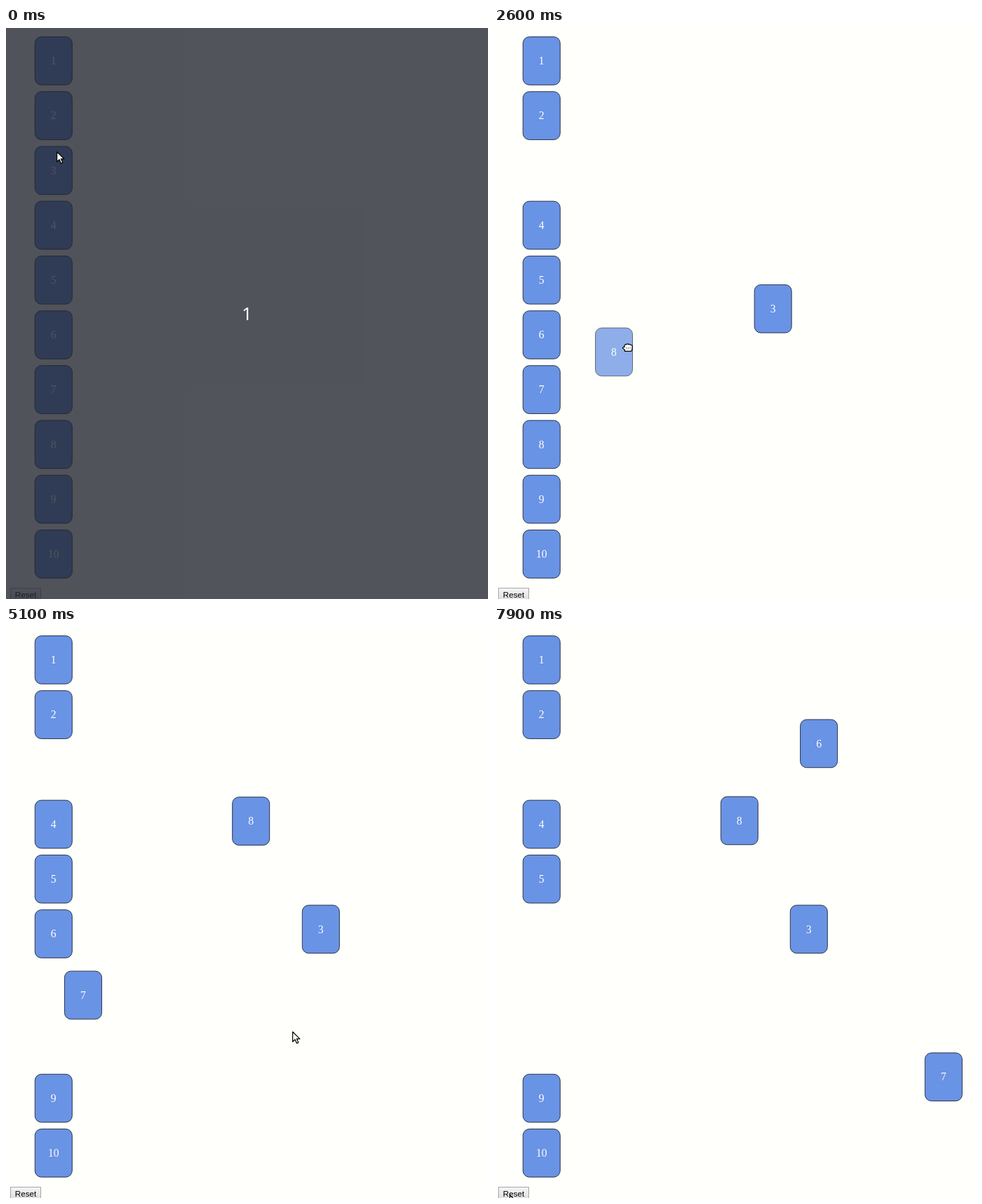
These frames come from a looping animation (687 by 815 pixels, 8 s). An HTML page:

```html
<!DOCTYPE html>
<html lang="en">
<head>
<meta charset="utf-8">
<title>Draggable cards</title>
<style>
  html, body { margin: 0; width: 100%; height: 100%; overflow: hidden; background: #fffffc; }
  #stage { position: relative; width: 687px; height: 815px; overflow: hidden; background: #fffffc; }
  #stage > * { position: absolute; left: 0; top: 0; }
  .card {
    box-sizing: border-box; width: 62px; height: 80px; transform-origin: 0 0;
    border: 1px solid #1c212c; border-radius: 11px; background: #6993e4;
    color: #fff; font: 18px/78px "Liberation Serif", serif; text-align: center;
  }
  #ghost { opacity: .75; }
  #stage > #reset {
    left: 6px; top: 799px; box-sizing: border-box; width: 44px; height: 20px;
    border: 1px solid #a6a6a6; background: linear-gradient(#f5f5f5, #dcdcdc);
    color: #000; font: 11.6px/18px "Liberation Sans", sans-serif; text-align: center;
  }
  #reset.hover { border-color: #777; }
  #shade { width: 687px; height: 815px; background: rgba(34, 38, 47, .787); }
  #count {
    position: absolute; left: 0; right: 0; top: 387px; text-align: center;
    color: #fff; font: 26px/40px "Noto Sans", sans-serif;
  }
  #pointer { overflow: visible; }
  #pointer path { fill: #fff; stroke: #000; stroke-width: 1.2; stroke-linejoin: round; }
  #pointer .knuckles { stroke-dasharray: 1 2; }
</style>
</head>
<body>
<div id="stage">
  <div id="reset">Reset</div>
  <div id="ghost" class="card"></div>
  <div id="shade"><div id="count">1</div></div>
  <svg id="pointer" width="20" height="20">
    <path id="arrow" d="M.6 .8V15L4 11.8 6.4 17.2 8.8 16.1 6.4 10.9H10.8Z"/>
    <g id="hand">
      <path d="M-3.6 5.4V3.4L-6.4 1Q-6.8-.9-4.6-1L-4-.4V-3Q-3.2-4.8-1.4-4.2 .1-5.8 1.6-4.4 3.4-5.3 4.4-3.7 6.8-4 7.1-1.8V1.6L5.8 5.4Z"/>
      <path class="knuckles" d="M-1.5 .9H5"/>
    </g>
  </svg>
</div>
<script>
const LOOP = 8000, STEP = 100;
const SCALE = .869, HOME_X = 47 * SCALE;
const GLIDE = 1920, GLIDE_DELAY = 100;
const DROP_SHIFT = { x: 24, y: 12 };
const homeY = n => (14 + 90 * (n - 1)) * SCALE;

// Turning points of the pointer: time, x, y
const path = [
  [0, 72, 176], [400, 72, 176], [600, 68, 202], [900, 495, 416], [1400, 425, 418],
  [1900, 235, 541], [2200, 87, 588], [3200, 345, 258], [3300, 329, 255],
  [3900, 47, 519], [4400, 284, 531], [4500, 284, 531], [4836, 596, 633],
  [5700, -20, 450], [5800, -20, 445], [6000, 60, 430], [6500, 461, 126],
  [7600, 22, 810], [LOOP, 22, 810]
];

const $ = id => document.getElementById(id);
const mix = (a, b, p) => a + (b - a) * p;
const show = (el, on) => { el.style.display = on ? "" : "none"; };
const place = (el, { x, y }, scale = 1) => {
  el.style.transform = `translate(${x}px,${y}px) scale(${scale})`;
};
const bezier = (a, b, u) => 3 * a * u * (1 - u) ** 2 + 3 * b * u * u * (1 - u) + u ** 3;

// The standard CSS "ease" curve
function ease(p) {
  if (p <= 0) return 0;
  if (p >= 1) return 1;
  let lo = 0, hi = 1;
  for (let i = 0; i < 24; i++) {
    const mid = (lo + hi) / 2;
    if (bezier(.25, .25, mid) < p) lo = mid; else hi = mid;
  }
  return bezier(.1, 1, lo);
}

function pointerAt(t) {
  const i = path.findIndex(k => k[0] > t);
  const [t0, x0, y0] = path[i - 1], [t1, x1, y1] = path[i];
  const p = (t - t0) / (t1 - t0);
  return { x: mix(x0, x1, p), y: mix(y0, y1, p) };
}

// The ghost keeps the pointer's grip; the card then glides to where it was dropped.
function makeDrag(n, from, to) {
  const home = { x: HOME_X, y: homeY(n) };
  const grab = pointerAt(from);
  const ghostAt = t => {
    const { x, y } = pointerAt(t);
    return { x: home.x + x - grab.x, y: home.y + y - grab.y };
  };
  const drop = ghostAt(to);
  const cardAt = t => {
    const p = ease((t - to - GLIDE_DELAY) / GLIDE);
    return {
      x: mix(home.x, drop.x + DROP_SHIFT.x, p),
      y: mix(home.y, drop.y + DROP_SHIFT.y, p)
    };
  };
  return { n, from, to, ghostAt, cardAt };
}

const drags = [
  makeDrag(3, 600, 1400),
  makeDrag(8, 2200, 3200),
  makeDrag(7, 3900, 4836),
  makeDrag(6, 6000, 6500)
];

const cards = {};
for (let n = 1; n <= 10; n++) {
  const card = document.createElement("div");
  card.className = "card";
  card.textContent = n;
  $("stage").insertBefore(card, $("ghost"));
  place(card, { x: HOME_X, y: homeY(n) }, SCALE);
  cards[n] = card;
}

function draw(t) {
  const tip = pointerAt(t);
  place($("pointer"), { x: Math.round(tip.x), y: Math.round(tip.y) });

  const drag = drags.find(d => t >= d.from && t < d.to);
  show($("hand"), drag);
  show($("arrow"), !drag);
  show($("ghost"), drag && t > drag.from);
  if (drag) {
    $("ghost").textContent = drag.n;
    place($("ghost"), drag.ghostAt(t), SCALE);
  }
  for (const d of drags) place(cards[d.n], d.cardAt(t), SCALE);

  $("shade").style.opacity = Math.max(0, 1 - t / 300);
  $("reset").classList.toggle("hover", t >= 7600);
}

const begin = performance.now();
function tick() {
  const t = (performance.now() - begin) % LOOP;
  draw(Math.floor(t / STEP) * STEP);
  requestAnimationFrame(tick);
}
tick();
</script>
</body>
</html>
```
